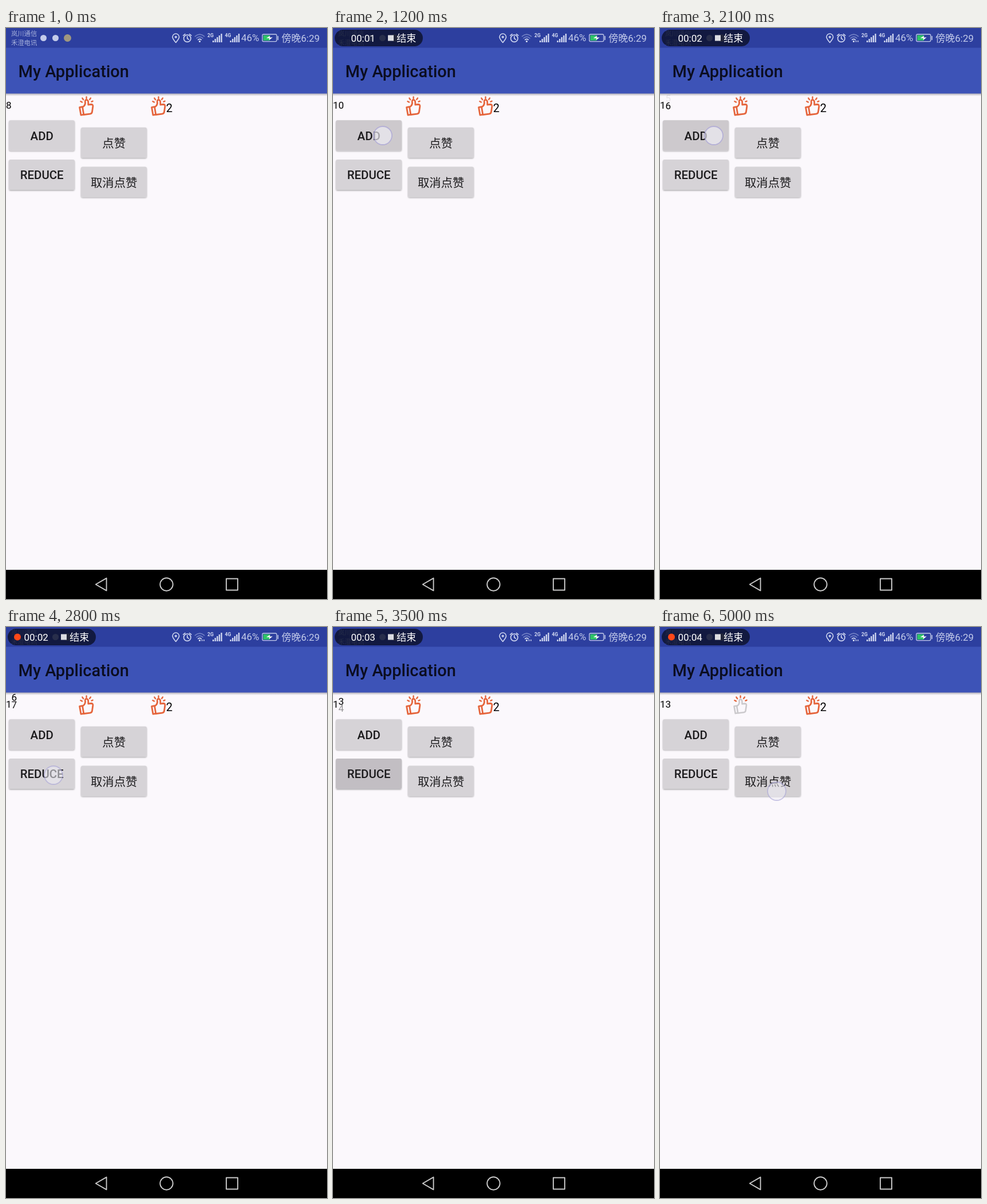
Write an HTML page that moves like this. It is 561x998 px and loops after 5.1 s.

```html
<!DOCTYPE html>
<html lang="zh">
<head>
<meta charset="utf-8">
<title>Counter demo</title>
<style>
  html, body { margin: 0; width: 100%; height: 100%; overflow: hidden; background: #fbf8fc; }
  svg { display: block; width: 100%; height: 100%; font-family: Roboto, "Noto Sans CJK SC", "Noto Sans CJK", sans-serif; }
  .line { fill: none; stroke-linecap: round; stroke-linejoin: round; }
  .status { fill: #c3cbea; font-size: 17px; }
  .carrier { fill: #a8b3dd; font-size: 11.3px; }
  .net { fill: #d5dbf2; font-size: 8.5px; font-weight: 700; }
  .label { font-size: 20.4px; font-weight: 500; fill: #1c1b1d; text-anchor: middle; }
  .count { font-size: 17px; }
  .pill { fill: #fff; font-size: 17px; }
</style>
</head>
<body>
<svg viewBox="0 0 561 998" preserveAspectRatio="none">
  <defs>
    <linearGradient id="drop" x2="0" y2="1">
      <stop stop-color="#8e8c98" stop-opacity=".75"/>
      <stop offset="1" stop-color="#8e8c98" stop-opacity="0"/>
    </linearGradient>
    <filter id="lift" x="-10%" y="-15%" width="120%" height="140%">
      <feDropShadow dx="0" dy="1.4" stdDeviation="1.3" flood-color="#000" flood-opacity=".32"/>
    </filter>
    <g id="hand" class="line" stroke-width="2.8">
      <path d="M128.6 138.6 133.6 137.6 135.8 151.3 131 152.2Z"/>
      <path d="M134 138.2C138 135.6 139 132 138.3 128.4C138.2 124.6 143 124.4 143.7 128.8L143.8 134.2 148.8 133.5Q152.2 133.4 151.9 137L150.4 147.2Q149.8 149.7 147 150.1L136 151.5"/>
    </g>
    <path id="shine" class="line" stroke="#e5653c" stroke-width="2.4"
      d="M130.4 128.2 133 129.6M133.4 122.6 135.2 125.2M140.6 120.4V123.2M148 122.4 146.2 125M149.4 128.8 151.6 127.8"/>
    <g id="bars" fill="#d5dbf2"></g>
  </defs>

  <rect width="561" height="998" fill="#fbf8fc"/>
  <rect y="114" width="561" height="5" fill="url(#drop)"/>
  <rect y="34" width="561" height="80.5" fill="#3d53b7"/>
  <rect width="561" height="34.5" fill="#2d3f9f"/>
  <text x="21.5" y="86" font-size="29" font-weight="500" fill="#0b0d20">My Application</text>

  <g id="statusLeft">
    <text class="carrier" x="9" y="14.3">岚川通信</text>
    <text class="carrier" x="9" y="30.2">禾澄电讯</text>
    <circle cx="65.5" cy="17.5" r="5.5" fill="#c3cbea"/>
    <circle cx="86.5" cy="17.5" r="5.5" fill="#c3cbea"/>
    <circle cx="107.5" cy="17.5" r="6.5" fill="#a0977f"/>
  </g>

  <g class="line" stroke="#d0d7f0" stroke-width="1.6">
    <path d="M296.8 25.5C293 21 291 18.5 291 15.8A5.8 5.8 0 0 1 302.6 15.8C302.6 18.5 300.6 21 296.8 25.5Z"/>
    <circle cx="296.8" cy="15.8" r="1.3"/>
    <circle cx="316.8" cy="18.2" r="6.2"/>
    <path d="M316.8 14.6V18.4L319.3 20M309.8 13.2 313 10.6M323.8 13.2 320.6 10.6"/>
    <path d="M330.4 14.6Q338.5 7.6 346.6 14.6M333 17.8Q338.5 13 344 17.8" stroke="#7583c6"/>
    <path d="M335.6 20.6Q338.5 18.2 341.4 20.6"/>
    <circle cx="338.5" cy="23.4" r=".8"/>
    <path id="traffic" d="M342.6 22.6V24M346 22.6V24"/>
  </g>
  <text class="net" x="352" y="16">2G</text>
  <use href="#bars" x="361"/>
  <text class="net" x="382.5" y="16">4G</text>
  <use href="#bars" x="391.5"/>
  <text class="status" x="411" y="23.3">46%</text>
  <rect x="448" y="11" width="25" height="12.6" rx="2" class="line" stroke="#c3cbea" stroke-width="1.3"/>
  <path d="M475.3 14.5V20.5" class="line" stroke="#c3cbea" stroke-width="1.6"/>
  <rect x="449.6" y="12.6" width="11.6" height="9.4" fill="#2fc367"/>
  <path d="M455 17.8 461.6 13.4 460.8 16.6 466 16.4 459.6 21.2 460.4 18Z" fill="#fff"/>
  <text class="status" x="481.5" y="24">傍晚6:29</text>

  <g id="recorder">
    <rect x="3" y="3" width="154" height="29" rx="14.5" fill="#0e1330" fill-opacity=".85"/>
    <circle id="blink" cx="20" cy="17.5" r="6" fill="#ff4819"/>
    <text id="clock" class="pill" x="31.5" y="23.7">00:00</text>
    <rect x="96" y="12.5" width="10" height="10" fill="#dcdde2"/>
    <text class="pill" x="111.3" y="24">结束</text>
  </g>

  <text id="fixed" class="count" x="0" y="140.6"></text>
  <text id="outgoing" class="count"></text>
  <text id="incoming" class="count"></text>

  <use id="shine1" href="#shine"/>
  <use id="hand1" href="#hand"/>
  <use href="#shine" x="126"/>
  <use href="#hand" x="126" stroke="#e5653c"/>
  <text x="279.8" y="147.4" font-size="20">2</text>

  <g id="buttons"></g>
  <g id="touch">
    <circle r="16" fill="#eeedf5" fill-opacity=".66"/>
    <circle id="ring" r="16" fill="none" stroke="#aaa5d6" stroke-opacity=".75" stroke-width="1.8"/>
  </g>

  <rect y="947" width="561" height="51"/>
  <g class="line" stroke="#c9c9c9" stroke-width="1.9">
    <path d="M156.8 972.5 175.6 961.6V983.4Z"/>
    <circle cx="280.5" cy="972.5" r="11.2"/>
    <rect x="385" y="962.5" width="20" height="20"/>
  </g>
</svg>
<script>
const LOOP = 5100, ROLL = 250, STEP = 12.3, BASE = 140.6, SECOND = 1030;
const $ = id => document.getElementById(id);
const clamp = v => Math.max(0, Math.min(1, v));
const set = (node, attrs) => { for (const k in attrs) node.setAttribute(k, attrs[k]); };
const add = (parent, tag, attrs) => {
  const node = document.createElementNS(parent.namespaceURI, tag);
  set(node, attrs);
  return parent.appendChild(node);
};

for (let i = 0; i < 5; i++) {
  const h = 3 + i * 3;
  add($('bars'), 'rect', { x: i * 3.6, y: 25 - h, width: 2.3, height: h });
}

const buttons = [['ADD', 5, 161.3], ['REDUCE', 5, 230], ['点赞', 131, 173.8], ['取消点赞', 131, 242.5]]
  .map(([name, x, y], i) => {
    const box = { x, y, width: 115, height: 53, rx: 3 };
    add($('buttons'), 'rect', { ...box, fill: '#d6d3d7', filter: 'url(#lift)' });
    const shade = add($('buttons'), 'rect', { ...box, fill: '#bbb7bc' });
    add($('buttons'), 'text', { class: 'label', x: x + 57.7, y: y + (i < 2 ? 34.3 : 35) }).textContent = name;
    return shade;
  });

// A tap acts on release; dx is the change it makes to the counter.
const tap = (button, x, y, up, dx = 0, down = up - 80) => ({ button, x, y, up, dx, down });
const taps = [
  tap(0, 87, 193, 612, 1),
  tap(0, 87, 190, 900, 1),
  tap(0, 87, 188, 1230, 1, 1080),
  ...[1, 2, 3, 4, 5].map(i => tap(0, 87 + i, 188, 1230 + i * 128, 1)),
  tap(0, 94, 188, 2270, 1, 1980),
  ...[0, 1, 2, 3].map(i => tap(1, 83, 259, 2780 + i * 190, -1, 2720 + i * 190)),
  tap(2, 203, 199, 4000),
  tap(3, 204, 287, 4980)
];

function drawCounter(t) {
  const done = taps.filter(p => p.dx && p.up <= t);
  const value = done.reduce((sum, p) => sum + p.dx, 8);
  const last = done[done.length - 1];
  const dx = last ? last.dx : 0;
  const p = last ? clamp((t - last.up) / ROLL) : 1;
  const now = String(value), old = String(value - dx);
  // Only the digits that differ roll.
  let keep = 0;
  if (now.length === old.length) while (keep < now.length && now[keep] === old[keep]) keep++;
  const x = keep * 9.55;
  $('fixed').textContent = now.slice(0, keep);
  $('incoming').textContent = now.slice(keep);
  $('outgoing').textContent = old.slice(keep);
  set($('incoming'), { x, y: BASE + dx * STEP * (1 - p) });
  set($('outgoing'), { x, y: BASE - dx * STEP * p, opacity: 1 - p });
}

function drawTouches(t) {
  const shade = [0, 0, 0, 0];
  let current = null;
  for (const p of taps) {
    if (t < p.down) continue;
    const level = clamp((t - p.down - 90) / 60) * clamp((p.up + 240 - t) / 90);
    shade[p.button] = Math.max(shade[p.button], level);
    if (t < p.up + 130) current = p;
  }
  buttons.forEach((b, i) => set(b, { opacity: shade[i] * 0.72 }));
  const fade = current ? clamp((current.up + 130 - t) / 130) : 0;
  set($('touch'), { opacity: fade });
  if (current) set($('touch'), { transform: `translate(${current.x} ${current.y})` });
  set($('ring'), { opacity: clamp(fade * 2 - 0.7) });
}

function draw(t) {
  set($('recorder'), { opacity: t >= 100 ? 1 : 0 });
  set($('blink'), { opacity: t % SECOND >= SECOND / 2 ? 1 : 0 });
  $('clock').textContent = '00:0' + Math.floor(t / SECOND);
  set($('traffic'), { opacity: t >= 1950 ? 1 : 0 });
  drawCounter(t);
  drawTouches(t);
  const off = t >= 4985;
  const size = off ? 0.92 : 1;
  set($('hand1'), {
    stroke: off ? '#cbc9cc' : '#e5653c',
    transform: `translate(140 138.5) scale(${size}) translate(-140 -138.5)`
  });
}

function frame() {
  draw(performance.now() % LOOP);
  requestAnimationFrame(frame);
}
frame();
</script>
</body>
</html>
```
